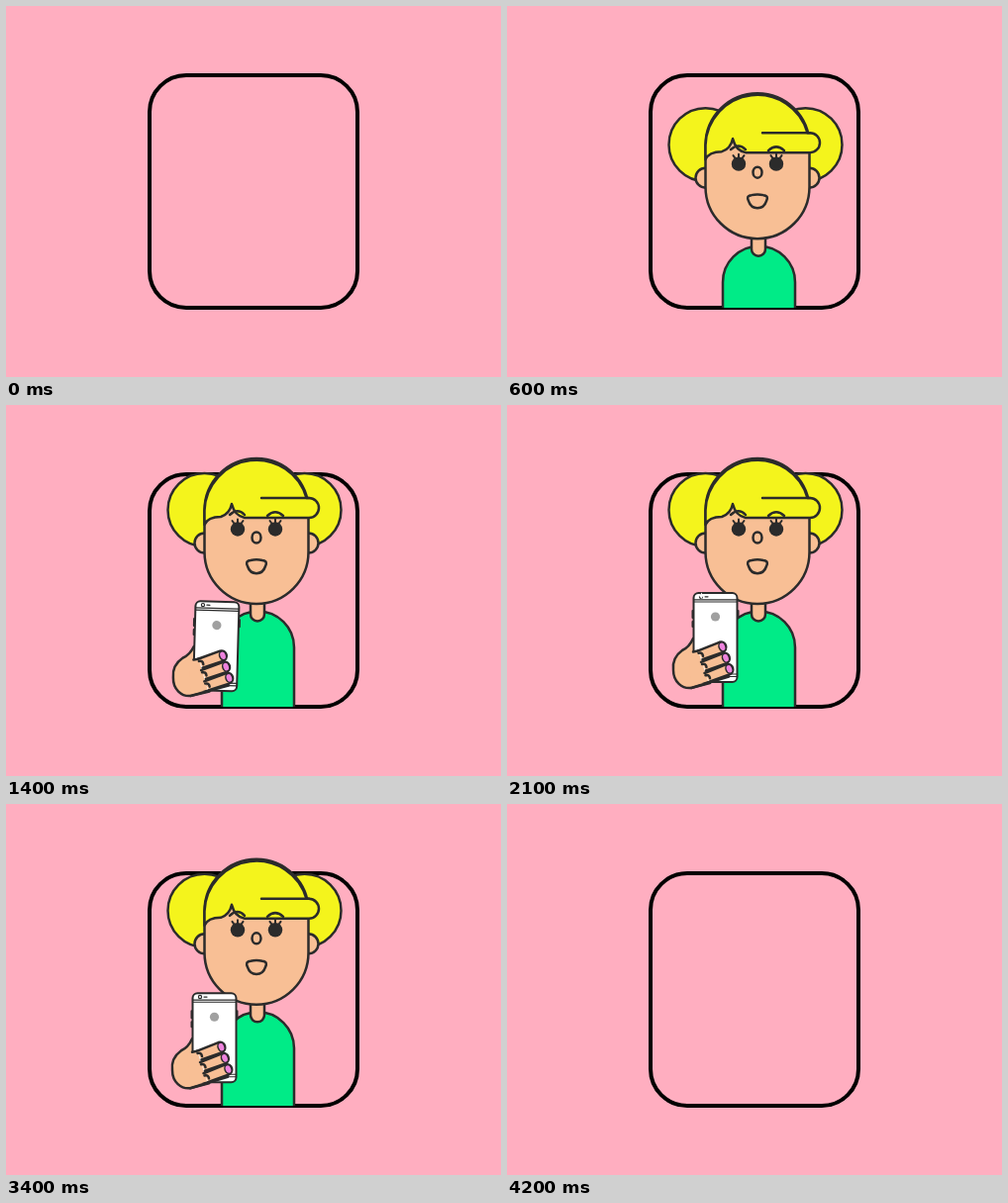
Animation of 500 by 375 pixels, one loop 4600 ms. Source, as an HTML page:

```html
<!DOCTYPE html>
<html lang="en">
<head>
<meta charset="utf-8">
<title>Selfie</title>
<style>
  html, body { margin: 0; width: 100%; height: 100%; overflow: hidden; background: #ffaec0; }
  svg { display: block; width: 100%; height: 100%; }
  .ink { stroke: #2b2b2b; stroke-width: 2.5; stroke-linecap: round; stroke-linejoin: round; }
  .skin { fill: #f8bf95; }
  .hair { fill: #f4f41c; }
  .line { fill: none; }
  .dark { fill: #2b2b2b; stroke: none; }
  .nail { fill: #ee82dd; stroke-width: 1.5; }
  .thin { stroke-width: 1.2; }
</style>
</head>
<body>
<svg viewBox="0 0 500 375">
  <defs>
    <clipPath id="ground"><rect width="500" height="305"/></clipPath>
    <g id="eye">
      <circle class="dark" r="7.2"/>
      <path class="line" stroke-width="2" d="M-3-5L-5.5-8.5M0-6V-10M3-5L5.5-8.5"/>
    </g>
    <g id="finger">
      <path class="skin" d="M0 0L22-8.8C29-10.5 31.5-1 25 1.5L5 8.7"/>
      <ellipse class="nail" cx="25" cy="-4.2" rx="3.4" ry="4.6" transform="rotate(-20 25 -4.2)"/>
      <path class="line" d="M1 2.2q4-1 4.5 3"/>
    </g>
  </defs>

  <rect x="145" y="70" width="210" height="235" rx="37" fill="none" stroke="#000" stroke-width="4"/>

  <g clip-path="url(#ground)">
    <g id="girl" class="ink">
      <g class="hair"><circle cx="200.5" cy="106" r="37"/><circle cx="301.5" cy="106" r="37"/></g>
      <g class="skin"><circle cx="200.5" cy="139.5" r="10"/><circle cx="305.5" cy="139.5" r="10"/></g>
      <path fill="#00eb87" d="M218 320V245a36.5 36.5 0 0 1 73 0V320"/>
      <path class="skin" d="M247 190V211.500a7 7 0 0 0 14 0V190"/>
      <rect class="skin" x="200.500" y="54" width="105" height="147" rx="52.500"/>
      <path class="hair" d="M200.500 121V106.500A52.500 52.500 0 0 1 303.500 94H306a10 10 0 0 1 0 20H241Q231 112 228 100Q226 110 217 113C208 113 203 115 200.500 121Z"/>
      <path class="line" d="M258 94H306M226 111Q234 103.500 241 111M264 112Q272 104.500 280 112"/>
      <use href="#eye" x="234" y="125.500"/>
      <use href="#eye" x="272" y="125.500"/>
      <ellipse class="line" cx="253" cy="134" rx="4.500" ry="5.500"/>
      <path class="line" d="M247 157Q253 155.500 259 157C263.500 157.500 263.500 160 262 163C259 172.500 247 172.500 244 163C242.500 160 242.500 157.500 247 157Z"/>
    </g>

    <g id="phone" class="ink">
      <path class="skin" d="M196 234L188 236Q184 245 177 248C170 253 167 260 168 268C168 280 177 287 186 286L205 281Z"/>
      <path stroke-width="2" d="M187.500 208v7M187.500 219v5M233.500 208v7"/>
      <rect x="188.500" y="190" width="44" height="90" rx="5" fill="#fff" stroke-width="2"/>
      <g class="line thin">
        <path d="M189 196.800H232M189 199H232M189 272H232M189 274.500H232"/>
        <circle cx="196" cy="193.800" r="1.600"/>
        <path d="M200 193.800h3"/>
      </g>
      <circle cx="210.500" cy="214" r="4.600" fill="#a0a0a0" stroke="none"/>
      <path class="skin" stroke="none" d="M183 251L193 248L203 279L186 284.800Z"/>
      <path class="line" d="M188 249.500L193 248.500"/>
      <path class="skin" d="M186 286L201 281.500L224 274.500" />
      <use href="#finger" x="199.500" y="271"/>
      <use href="#finger" x="196" y="259.800"/>
      <use href="#finger" x="192.500" y="248.600"/>
      <path id="flash" fill="#fff" stroke="none" d="M0-6.500L2-2L8.500 0L2 2L0 6.500L-2 2L-8.500 0L-2-2Z"/>
    </g>
  </g>
</svg>
<script>
  const LOOP = 4600, STEP = 100;
  const GIRL_DROP = 258, PHONE_DROP = 176, TILT = 0.19;
  const byId = id => document.getElementById(id);
  const girl = byId("girl"), phone = byId("phone"), flash = byId("flash");

  // Cubic Bezier easing with handles (.8, 0) and (.57, 1), solved by bisection.
  function ease(x) {
    if (x <= 0) return 0;
    if (x >= 1) return 1;
    let lo = 0, hi = 1, s;
    for (let i = 0; i < 20; i++) {
      s = (lo + hi) / 2;
      const at = 2.4 * s * (1 - s) ** 2 + 1.71 * s * s * (1 - s) + s ** 3;
      if (at < x) lo = s; else hi = s;
    }
    return s * s * (3 - 2 * s);
  }

  // How far below its resting place a part is: 1 is hidden, 0 is at rest.
  const rise = (t, end) => ease((end - t) / 900);
  const fall = t => ease((t - 3300) / 900);

  function draw(now) {
    const t = Math.floor(now % LOOP / STEP) * STEP;
    const out = fall(t);
    const inPhone = rise(t, 1640) * PHONE_DROP;
    girl.setAttribute("transform", `translate(0 ${(rise(t, 966) + out) * GIRL_DROP})`);
    phone.setAttribute("transform",
      `translate(0 ${inPhone + out * PHONE_DROP}) rotate(${inPhone * TILT} 200 300)`);
    const glow = t >= 2100 && t < 2600 ? Math.sin((t - 2000) / 600 * Math.PI) : 0;
    flash.setAttribute("transform", `translate(196.5 192.7) scale(${glow})`);
    requestAnimationFrame(draw);
  }
  requestAnimationFrame(draw);
</script>
</body>
</html>
```
